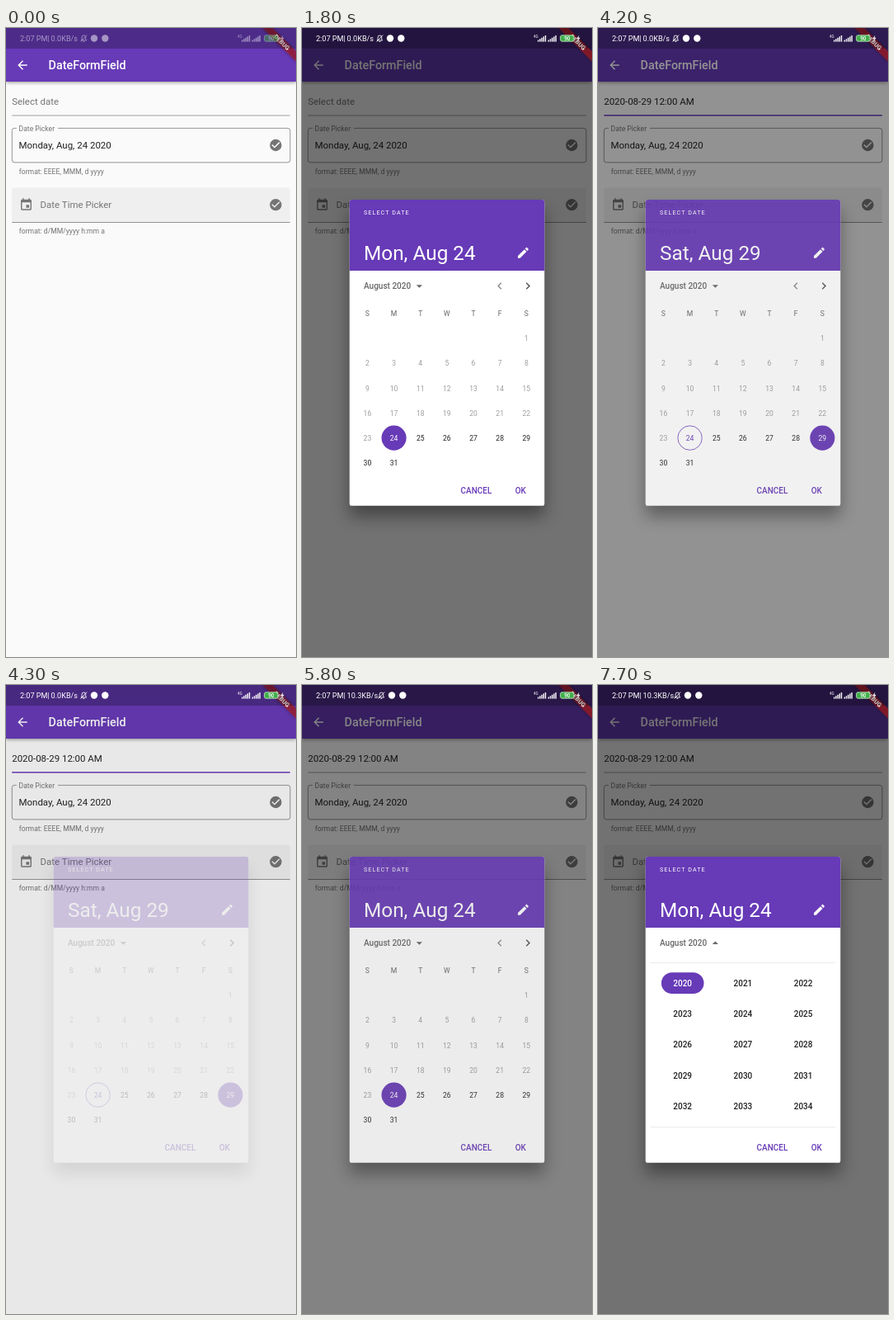
These frames come from a looping animation (352 by 762 pixels, 8000 ms). An HTML page:

```html
<!DOCTYPE html>
<html lang="en">
<head>
<meta charset="utf-8">
<title>Date picker demo</title>
<style>
  html, body { margin: 0; width: 100%; height: 100%; overflow: hidden; background: #fafafa; }
  svg { display: block; width: 100%; height: 100%; font-family: Roboto, sans-serif; }
</style>
</head>
<body>
<svg id="stage" viewBox="0 0 352 762"></svg>
<script>
const LOOP = 8000, STEP = 100;
const DP = 0.717; // stage pixels per layout unit
const PURPLE = '#673ab7', INK = '#212121', GREY = '#757575', LINE = '#8a8a8a';

const ICONS = {
  back: 'M20 11H7.83l5.59-5.59L12 4l-8 8 8 8 1.41-1.41L7.83 13H20z',
  check: 'M12 2a10 10 0 1 0 0 20 10 10 0 0 0 0-20zm-2 15l-5-5 1.41-1.41L10 14.17l7.59-7.59L19 8z',
  event: 'M17 12h-5v5h5zM16 1v2H8V1H6v2H5a2 2 0 0 0-2 2v14a2 2 0 0 0 2 2h14a2 2 0 0 0 2-2V5a2 2 0 0 0-2-2h-1V1zm3 18H5V8h14z',
  edit: 'M3 17.25V21h3.75L17.81 9.94l-3.75-3.75zM20.71 7.04a1 1 0 0 0 0-1.41l-2.34-2.34a1 1 0 0 0-1.41 0l-1.83 1.83 3.75 3.75z',
  left: 'M15.41 7.41L14 6l-6 6 6 6 1.41-1.41L10.83 12z',
  right: 'M10 6L8.59 7.41 13.17 12l-4.58 4.59L10 18l6-6z',
  drop: 'M7 10l5 5 5-5z'
};

const range = (n, fn) => Array.from({ length: n }, (_, i) => fn(i)).join('');

// Value of the last [start, value] pair already reached.
const at = (t, pairs) => pairs.reduce((value, [start, next]) => t >= start ? next : value, pairs[0][1]);

const text = (x, y, content, size, fill, attrs = '') =>
  `<text x="${x}" y="${y}" font-size="${size * DP}" fill="${fill}" ${attrs}>${content}</text>`;
const medium = 'font-weight="500"';
const middle = 'text-anchor="middle"';

const rect = (x, y, w, h, fill, attrs = '') =>
  `<rect x="${x}" y="${y}" width="${w}" height="${h}" fill="${fill}" ${attrs}/>`;
const circle = (x, y, r, fill, attrs = '') =>
  `<circle cx="${x}" cy="${y}" r="${r}" fill="${fill}" ${attrs}/>`;
const icon = (name, x, y, fill, turn = 0) =>
  `<path d="${ICONS[name]}" fill="${fill}"
    transform="translate(${x} ${y}) rotate(${turn}) scale(${DP}) translate(-12 -12)"/>`;

function page(t) {
  const picked = t >= 4200;
  const focused = picked && t < 5800;
  return rect(0, 0, 352, 762, '#fafafa')
    + rect(0, 0, 352, 65, PURPLE, 'style="filter:drop-shadow(0 1.5px 2px #0006)"')
    + icon('back', 20, 45, '#fff')
    + text(51.6, 50.2, 'DateFormField', 20, '#fff', medium)

    + text(7.2, 93.2, picked ? '2020-08-29 12:00 AM' : 'Select date', 16, picked ? INK : GREY)
    + (focused ? rect(7.2, 105.1, 337.6, 1.5, PURPLE) : rect(7.2, 105.6, 337.6, .8, LINE))

    + `<path d="M63 121.4H342a2.9 2.9 0 0 1 2.9 2.9V160a2.9 2.9 0 0 1-2.9 2.9H10.2
        a2.9 2.9 0 0 1-2.9-2.9V124.3a2.9 2.9 0 0 1 2.9-2.9H12.8" fill="none" stroke="${LINE}" stroke-width=".9"/>`
    + text(15.5, 125.2, 'Date Picker', 12, GREY)
    + text(15.5, 145.6, 'Monday, Aug, 24 2020', 16, INK)
    + icon('check', 327.4, 142, GREY)
    + text(15.8, 177, 'format: EEEE, MMM, d yyyy', 12, GREY)

    + `<path d="M7.2 235.5V196.4a2.9 2.9 0 0 1 2.9-2.9H341.9a2.9 2.9 0 0 1 2.9 2.9V235.5z" fill="#efefef"/>`
    + rect(7.2, 235, 337.6, .9, LINE)
    + icon('event', 24.5, 214.2, GREY)
    + text(41.6, 218.3, 'Date Time Picker', 16, GREY)
    + icon('check', 327.4, 214.2, GREY)
    + text(15.8, 249, 'format: d/MM/yyyy h:mm a', 12, GREY);
}

function monthGrid(selected) {
  const columnX = column => 79.4 + column * 32.16;
  const weekdays = range(7, i => text(columnX(i), 349.2, 'SMTWTFS'[i], 12, '#666', middle));
  const days = range(31, i => {
    const day = i + 1, cell = i + 6;
    const x = columnX(cell % 7), y = 376.2 + Math.floor(cell / 7) * 30.1;
    const isSelected = day === selected, isToday = day === 24;
    const mark = isSelected ? circle(x, y, 15.05, PURPLE)
      : isToday ? circle(x, y, 14.7, 'none', `stroke="${PURPLE}" stroke-width=".8"`) : '';
    const color = isSelected ? '#fff' : isToday ? PURPLE : day < 24 ? '#9e9e9e' : INK;
    return mark + text(x, y + 3.1, day, 12, color, middle);
  });
  return icon('left', 240, 312.5, '#8c8c8c') + icon('right', 274.2, 312.5, '#555') + weekdays + days;
}

function yearGrid() {
  const years = range(15, i => {
    const x = 102.7 + i % 3 * 73.2, y = 361.2 + Math.floor(i / 3) * 37.25;
    return (i ? '' : rect(x - 25.8, y - 12.9, 51.6, 25.8, PURPLE, 'rx="12.9"'))
      + text(x, y + 3.6, 2020 + i, 14, i ? INK : '#fff', `${medium} ${middle}`);
  });
  return rect(63.5, 336.2, 225, .7, '#e2e2e2') + rect(63.5, 535.4, 225, .7, '#e2e2e2') + years;
}

function dialog(t) {
  const saturday = t >= 3500 && t < 5800;
  const ink = t < 6800 ? 0 : t < 7000 ? 1 : Math.max(0, 1 - (t - 6900) / 500);
  const splash = 5 + Math.max(0, t - 6900) * .12;
  const turn = at(t, [[0, 0], [7000, 60], [7100, 135], [7200, 180]]);
  return rect(57.7, 208, 236.6, 370.8, '#fff', 'rx="2.9" style="filter:drop-shadow(0 13px 10px #0006)"')
    + `<path d="M57.7 294V210.9a2.9 2.9 0 0 1 2.9-2.9H291.4a2.9 2.9 0 0 1 2.9 2.9V294z" fill="${PURPLE}"/>`
    + text(75, 225.7, 'SELECT DATE', 10, '#fff', `letter-spacing="${1.5 * DP}"`)
    + text(75, 281.3, saturday ? 'Sat, Aug 29' : 'Mon, Aug 24', 34, '#fff')
    + icon('edit', 268.5, 272.3, '#fff')
    + `<g opacity="${ink}">` + rect(69.3, 295.5, 145, 36.5, '#0000000a', 'rx="2"')
    + circle(105.5, 313, splash, '#00000012', 'clip-path="inset(0)"') + '</g>'
    + text(75, 316.1, 'August 2020', 14, '#666', medium)
    + icon('drop', 142.4, 312.6, '#666', turn)
    + (t >= 7000 ? yearGrid() : monthGrid(saturday ? 29 : 24))
    + text(192.5, 564.1, 'CANCEL', 14, PURPLE, medium)
    + text(258.7, 564.1, 'OK', 14, PURPLE, medium);
}

function banner() {
  return '<g transform="translate(352 0) rotate(45)">'
    + rect(-40 * DP, 28 * DP, 80 * DP, 12 * DP, '#b71c1ca0', 'style="filter:drop-shadow(0 0 2px #0008)"')
    + text(0, 27, 'DEBUG', 10.2, '#fff', `font-weight="900" ${middle}`) + '</g>';
}

function statusBar(t) {
  const fast = t >= 5300;
  const shift = fast ? 2 : 0;
  const opacity = at(t, [[0, .5], [400, .62], [500, .75], [600, .88], [700, 1]]);
  const bars = x => range(5, i => rect(x + i * 2.2, 14.6 - i * 1.4, 1.4, 2 + i * 1.4, '#fff'));
  const size = 9.1 / DP;
  return rect(0, 0, 352, 25, '#00000040')
    + `<g opacity="${opacity}">`
    + text(17, 16, '2:07 PM', size, '#fff')
    + text(50.6, 15.6, '|', size, '#fff')
    + text(54.6, 16, fast ? '10.3KB/s' : '0.0KB/s', size, '#fff')
    + `<path transform="translate(${94.4 + shift} 12.6)" fill="none" stroke="#fff" stroke-width=".9"
        d="M-3.3 2.4H3.3L2.3 1V-1.3a2.3 2.3 0 0 0-4.6 0V1zM-.9 3.8H.9M-3.8 4L3.8-4"/>`
    + circle(107 + shift, 12.5, 4.2, '#fff') + circle(120.3 + shift, 12.5, 4.2, '#fff')
    + text(281, 11.8, '4G', 6.5, '#fff')
    + bars(286) + bars(298.6)
    + rect(313.6, 8.8, 16.4, 7.4, '#3fae49', 'rx="2" stroke="#d5ecd5" stroke-width=".8"')
    + text(321.8, 15, '90', 9, '#fff', `${medium} ${middle}`)
    + '<path d="M336.4 8.6l-3 4.4h2l-.8 3.4 3-4.6h-2z" fill="#fff"/></g>';
}

function scene(t) {
  const presence = at(t, [[0, 0], [1800, 1], [4200, .88], [4300, .22], [4400, 0], [5800, .85], [5900, 1]]);
  const shade = at(t, [[0, 0], [1800, .54], [4200, .42], [4300, .07], [4400, 0], [5800, .48], [5900, .54]]);
  return page(t)
    + rect(0, 0, 352, 762, '#000', `opacity="${shade}"`)
    + (presence ? `<g opacity="${presence}">${dialog(t)}</g>` : '')
    + banner() + statusBar(t);
}

const stage = document.getElementById('stage');
const start = performance.now();
let shown = -1;

function draw() {
  const t = Math.floor((performance.now() - start) % LOOP / STEP) * STEP;
  if (t !== shown) stage.innerHTML = scene(shown = t);
  requestAnimationFrame(draw);
}
draw();
</script>
</body>
</html>
```
